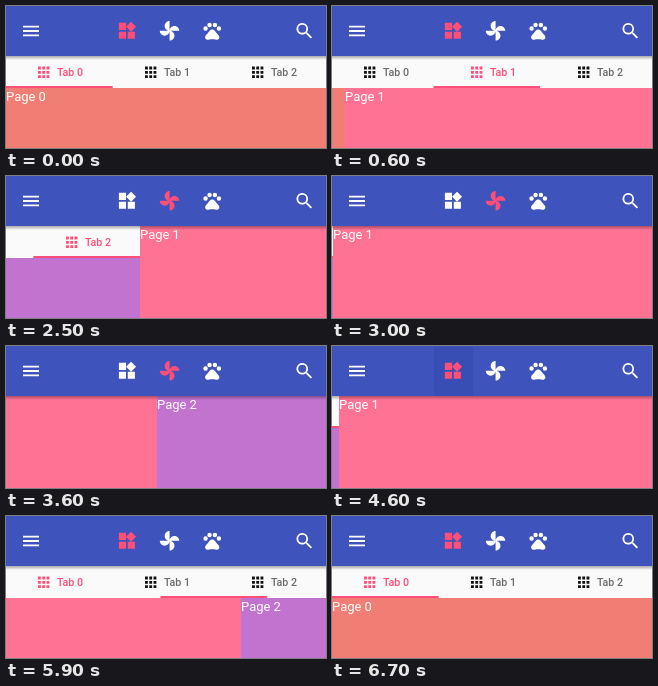
Write an HTML page that moves like this. It is 320 by 142 pixels and loops after 7000 ms.

```html
<!DOCTYPE html>
<html lang="en">
<head>
<meta charset="utf-8">
<title>Nested tabs</title>
<style>
  html, body { margin: 0; width: 100%; height: 100%; overflow: hidden; background: #3e53bb; }
  svg { display: block; width: 320px; height: 142px; }
  text { font-family: Roboto, Arial, sans-serif; }
  .page text { font-size: 13px; fill: #fff; }
  .tab text { font-size: 10.67px; font-weight: 500; fill: #6c6c6c; }
  .tab path { fill: #111; }
  .nav path { fill: #fff; }
  .tab.on text, .tab.on path, .nav .on path { fill: #ff4f78; }
</style>
</head>
<body>
<svg viewBox="0 0 320 142">
  <defs>
    <linearGradient id="shade" x2="0" y2="1">
      <stop offset="0" stop-color="#000" stop-opacity=".32"/>
      <stop offset="1" stop-color="#000" stop-opacity="0"/>
    </linearGradient>
  </defs>
  <g id="outer">
    <g id="inner"></g>
    <rect y="50" width="320" height="32" fill="#fafafa"/>
    <g id="tabs"></g>
    <rect id="bar" y="80" width="106.67" height="2" fill="#ff4f78"/>
  </g>
  <rect y="50" width="320" height="4" fill="url(#shade)"/>
  <rect width="320" height="50" fill="#3e53bb"/>
  <rect id="press" x="102" y="1" width="39" height="49" fill="#14288c"/>
  <g id="nav" class="nav"></g>
</svg>
<script>
const W = 320, TAB = W / 3, LOOP = 7000, STEP = 100;
const $ = id => document.getElementById(id);
const COLORS = ['#f07e74', '#fe7293', '#c173cf'];

const dot = (x, y) => `M${x - 2.5} ${y}a2.5 2.5 0 1 0 5 0a2.5 2.5 0 1 0-5 0z`;
const cells = [4, 10, 16].flatMap(y => [4, 10, 16].map(x => `M${x} ${y}h4v4h-4z`)).join('');
const ICONS = {
  menu: 'M3 18h18v-2H3zM3 13h18v-2H3zM3 6v2h18V6z',
  widgets: 'M13 13v8h8v-8zM3 21h8v-8H3zM3 3v8h8V3zM16.66 1.69L11 7.34 16.66 13l5.66-5.66z',
  fan: 'M12 12c0-3 2.5-5.5 5.5-5.5S23 9 23 12zM12 12c0 3-2.5 5.5-5.5 5.5S1 15 1 12z' +
    'M12 12c-3 0-5.5-2.5-5.5-5.5S9 1 12 1zM12 12c3 0 5.5 2.5 5.5 5.5S15 23 12 23z',
  paw: dot(4.5, 9.5) + dot(9, 5.5) + dot(15, 5.5) + dot(19.5, 9.5) +
    'M17.3 14.9l-2.4-2.9c-1-1.1-1.8-1.5-2.9-1.5s-1.9.4-2.9 1.5l-2.4 2.9' +
    'c-1.4 1.3-3 2.8-2.7 4.8.3 1 1 2 2.4 2.3.7.1 3-.5 5.6-.5s4.9.6 5.6.5' +
    'c1.4-.3 2.1-1.3 2.4-2.3.3-2-1.3-3.5-2.7-4.8z',
  search: 'M15.5 14h-.8l-.3-.3A6.5 6.5 0 1 0 13.7 14.4l.3.3v.8l5 5L20.5 19z' +
    'M9.5 14a4.5 4.5 0 1 1 0-9a4.5 4.5 0 0 1 0 9z',
  apps: cells
};

function icon(name, cx, cy, scale = 0.889) {
  const move = `translate(${cx - 12 * scale} ${cy - 12 * scale}) scale(${scale})`;
  return `<g transform="${move}"><path fill-rule="evenodd" d="${ICONS[name]}"/></g>`;
}

function page(i, top) {
  return `<g class="page" transform="translate(${i * W} ${top})">` +
    `<rect width="${W}" height="${142 - top}" fill="${COLORS[i]}"/>` +
    `<text x="0" y="13">Page ${i}</text></g>`;
}

$('inner').innerHTML = [0, 1, 2].map(i => page(i, 82)).join('');
$('outer').insertAdjacentHTML('beforeend', page(1, 50) + page(2, 50));
$('tabs').innerHTML = [0, 1, 2].map(i =>
  `<g class="tab" transform="translate(${i * 107} 0)">` +
  icon('apps', 37.7, 66.3, 0.71) + `<text x="51" y="70">Tab ${i}</text></g>`).join('');
$('nav').innerHTML = ['widgets', 'fan', 'paw'].map((name, i) =>
  `<g>${icon(name, 120.9 + i * 42.67, 24.8)}</g>`).join('') +
  icon('menu', 25, 25) + icon('search', 298.5, 25);

const clamp = v => Math.min(1, Math.max(0, v));
const glide = (t, start, span) => 1 - (1 - clamp((t - start) / span)) ** 5;

// A finger drag up to the release, then a decelerating settle.
function swipe(t, release, dragged) {
  const drag = clamp((t - release + 250) / 250) ** 1.3;
  return dragged * drag + (1 - dragged) * glide(t, release, 800);
}

const tabPos = t => swipe(t, 300, 0.58) + swipe(t, 1400, 0.631) - 2 * glide(t, 5830, 800);
const pagePos = t => swipe(t, 2500, 0.581) + swipe(t, 3600, 0.528) - 2 * glide(t, 4513.3, 650);

// Last value whose start time has passed.
const pick = (t, table) => table.filter(row => t >= row[0]).pop()[1];
const TAB_ON = [[0, 0], [300, 1], [1400, 2], [5900, 0]];
const NAV_ON = [[0, 0], [2500, 1], [3700, 2], [4600, 0]];
const PRESS = [[0, 0], [4600, 0.12], [5200, 0.06], [5300, 0]];

const shift = (id, x) => $(id).setAttribute('transform', `translate(${x} 0)`);
const mark = (id, on) => [0, 1, 2].forEach(i =>
  $(id).children[i].classList.toggle('on', i === on));

function draw(t) {
  shift('inner', -Math.round(tabPos(t) * W));
  shift('outer', -Math.round(pagePos(t) * W));
  shift('bar', tabPos(t - 20) * TAB);
  mark('tabs', pick(t, TAB_ON));
  mark('nav', pick(t, NAV_ON));
  $('press').setAttribute('opacity', pick(t, PRESS));
}

function tick() {
  draw(Math.floor((performance.now() + 4) / STEP) * STEP % LOOP);
  requestAnimationFrame(tick);
}
tick();
</script>
</body>
</html>
```
